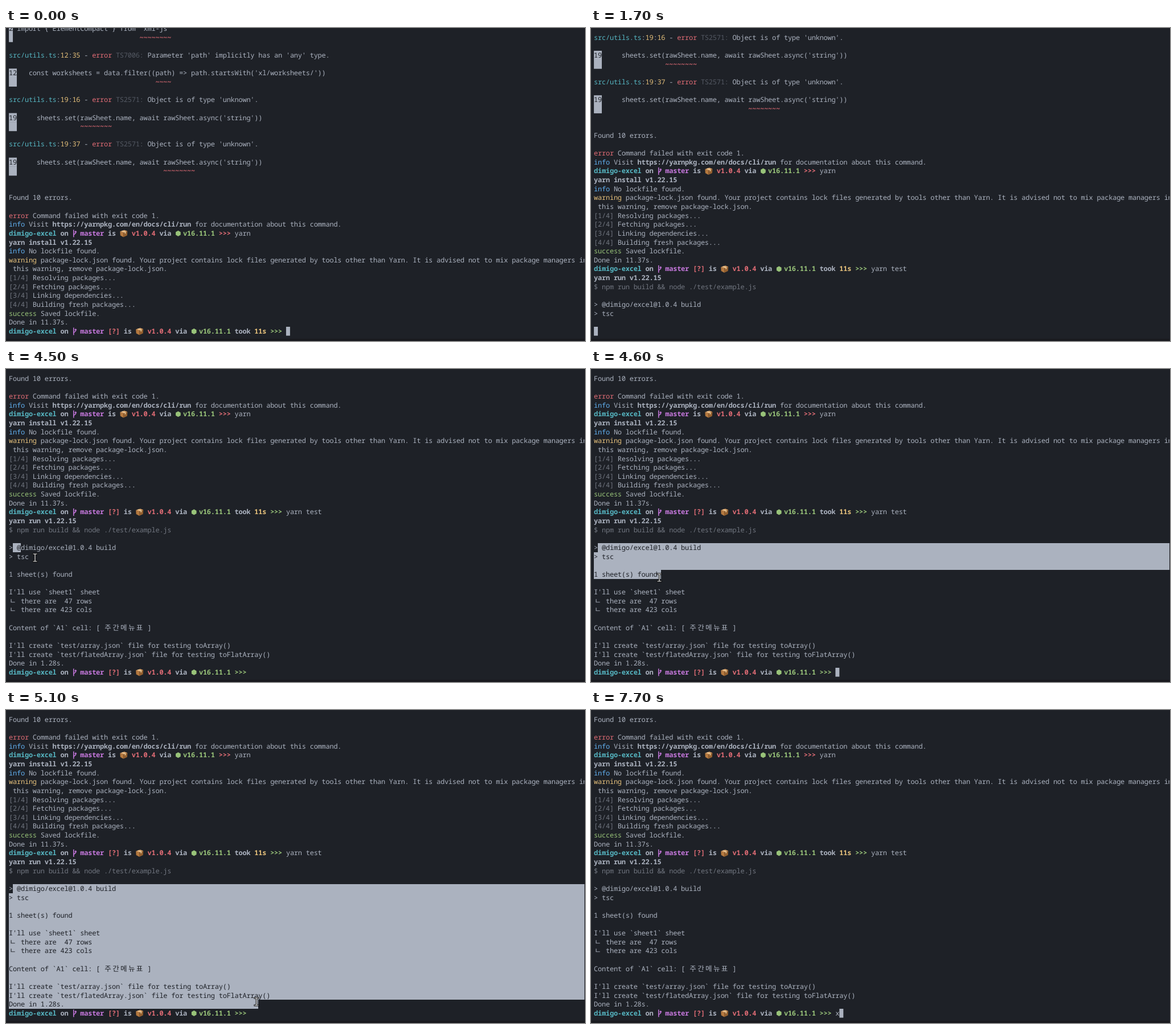
Animation of 1017 by 550 pixels, one loop 8000 ms. Source, as an HTML page with a canvas:

```html
<!DOCTYPE html>
<html lang="en">
<head>
<meta charset="utf-8">
<title>Terminal session</title>
<style>
html, body { margin: 0; width: 100%; height: 100%; overflow: hidden; background: #1e2127; }
canvas { display: block; }
</style>
</head>
<body>
<canvas id="stage" width="1017" height="550"></canvas>
<script>
const ctx = document.getElementById('stage').getContext('2d');
const W = 1017, H = 550, LOOP = 8000;
const CELL = 6.955, LINE = 15.645, LEFT = 5.1, LAST_TOP = 525, ROWS = 35;
const BG = '#1e2127', FG = '#abb2bf';
const SIZE = 12;
const MONO = SIZE + 'px "Noto Sans Mono", "DejaVu Sans Mono", monospace';
const HANGUL = '12.5px "Noto Sans CJK KR", "Noto Sans CJK", sans-serif';
// Noto Sans Mono advances 0.6 em; the terminal grid is slightly tighter.
const TRACKING = (CELL - SIZE * 0.6).toFixed(3) + 'px';

// Markup: ^ plus a colour letter starts a segment; upper case is bold, s is inverse.
const COLORS = {
  d: FG, c: '#56b6c2', y: '#e5c07b', r: '#e06c75', k: '#545963',
  g: '#70757f', b: '#61afef', m: '#c678dd', n: '#98c379', s: BG
};

const tildes = (gutter, col, n) =>
  '^s' + ' '.repeat(gutter) + '^R' + ' '.repeat(col - gutter) + '~'.repeat(n);
const issue = (pos, code, text) =>
  `^csrc/utils.ts^d:^y${pos.replace(':', '^d:^y')}^d - ^rerror ^k${code}: ^d${text}`;
const prompt = (git, took, mark) =>
  `^Cdimigo-excel ^Don ^M⎇ master ${git}^Dis 📦 ^Rv1.0.4 ^Dvia ^N⬢ v16.11.1 ${took}${mark}>>> ^d`;
const step = (n, text) => `^g[${n}/4] ^d${text}...`;

const unknown = "Object is of type 'unknown'.";
const setCall = "^s19^d     sheets.set(rawSheet.name, await rawSheet.async('string'))";
const testPrompt = prompt('^R[?] ', '^Dtook ^Y11s ', '^N');
const lastPrompt = prompt('^R[?] ', '', '^N');

const lines = [
  "^s2^d import { ElementCompact } from 'xml-js'",
  tildes(1, 33, 8),
  '',
  issue('12:35', 'TS7006', "Parameter 'path' implicitly has an 'any' type."),
  '',
  "^s12^d   const worksheets = data.filter((path) => path.startsWith('xl/worksheets/'))",
  tildes(2, 37, 4),
  '',
  issue('19:16', 'TS2571', unknown),
  '',
  setCall,
  tildes(2, 18, 8),
  '',
  issue('19:37', 'TS2571', unknown),
  '',
  setCall,
  tildes(2, 39, 8),
  '',
  '',
  'Found 10 errors.',
  '',
  '^rerror ^dCommand failed with exit code 1.',
  '^binfo ^dVisit ^Dhttps://yarnpkg.com/en/docs/cli/run^d for documentation about this command.',
  prompt('', '', '^R') + 'yarn',
  '^Dyarn install v1.22.15',
  '^binfo ^dNo lockfile found.',
  '^ywarning ^dpackage-lock.json found. Your project contains lock files generated by tools other than Yarn. It is advised not to mix package managers in',
  ' this warning, remove package-lock.json.',
  step(1, 'Resolving packages'),
  step(2, 'Fetching packages'),
  step(3, 'Linking dependencies'),
  step(4, 'Building fresh packages'),
  '^nsuccess ^dSaved lockfile.',
  'Done in 11.37s.',
  testPrompt + 'yarn test',
  '^Dyarn run v1.22.15',
  '^g$ npm run build && node ./test/example.js',
  '',
  '> @dimigo/excel@1.0.4 build',
  '> tsc',
  '',
  '1 sheet(s) found',
  '',
  "I'll use `sheet1` sheet",
  'ㄴ there are  47 rows',
  'ㄴ there are 423 cols',
  '',
  'Content of `A1` cell: [ 주간메뉴표 ]',
  '',
  "I'll create `test/array.json` file for testing toArray()",
  "I'll create `test/flatedArray.json` file for testing toFlatArray()",
  'Done in 1.28s.'
];
const TEST_ROW = 34, SELECT_ROW = 38, END_ROW = 52;

const keyTimes = [200, 300, 400, 500, 600, 800, 1100, 1200, 1300];
// [time, buffer row holding the cursor]
const scrolls = [[0, 34], [1400, 35], [1500, 37], [1700, 41], [2800, 52]];
const cursorOn = [[0, 2000], [2800, 3200], [3300, 3900], [4600, 5000], [5700, 6200], [6900, 7500], [7700, 8000]];
// Pointer position every 100 ms from the given start
const moves = [
  { from: 3500, to: 4500, path: [[786, 440], [640, 400], [480, 358], [330, 324], [190, 302], [90, 293], [32, 297], [8, 306], [12, 309]] },
  { from: 4500, to: 5700, path: [[51, 331], [120, 366], [205, 405], [300, 445], [385, 480], [443, 503], [440, 512], [432, 515], [423, 515]] },
  { from: 5700, to: 6400, path: [[445, 500], [520, 450], [620, 380], [730, 300], [832, 225], [916, 160], [945, 55]] }
];

const colX = col => LEFT + col * CELL;

function poly(color, points) {
  ctx.fillStyle = color;
  ctx.beginPath();
  points.forEach(([x, y]) => ctx.lineTo(x, y));
  ctx.fill();
}

function stroke(color, width, ...paths) {
  ctx.strokeStyle = color;
  ctx.lineWidth = width;
  ctx.beginPath();
  for (const [start, ...rest] of paths) {
    ctx.moveTo(...start);
    rest.forEach(p => ctx.lineTo(...p));
  }
  ctx.stroke();
}

function drawBranch(x, y, color) {
  stroke(color, 1.5,
    [[x + 2.4, y + 1.5], [x + 2.4, y + 14.5]],
    [[x + 6, y + 4.5], [x + 6, y + 7.5], [x + 2.4, y + 10.5]]);
  poly(color, [[x + 3.6, y + 6], [x + 6, y + 3], [x + 8.2, y + 6]]);
}

function drawHexagon(x, y, color) {
  poly(color, Array.from({ length: 6 }, (_, i) => {
    const a = Math.PI * (i / 3 + 1 / 6);
    return [x + 5.2 + 5 * Math.cos(a), y + 8 + 5 * Math.sin(a)];
  }));
}

function drawBox(x, y) {
  poly('#d9a066', [[x + .5, y + 4.5], [x + 8, y + 2], [x + 13.5, y + 4], [x + 6.5, y + 7]]);
  poly('#b5793f', [[x + .5, y + 4.5], [x + 6.5, y + 7], [x + 6.5, y + 14.5], [x + 1, y + 11.5]]);
  poly('#94602f', [[x + 6.5, y + 7], [x + 13.5, y + 4], [x + 13, y + 11.5], [x + 6.5, y + 14.5]]);
  poly('#edd0a0', [[x + 3.2, y + 3.6], [x + 5, y + 3], [x + 10.6, y + 5.3], [x + 10.4, y + 8], [x + 9, y + 8.6], [x + 8.8, y + 6]]);
}

function drawText(text, x, y, color, bold) {
  ctx.font = (bold ? 'bold ' : '') + MONO;
  ctx.letterSpacing = TRACKING;
  ctx.fillStyle = color;
  ctx.fillText(text, x, y + 12);
}

function drawWide(char, x, y, color) {
  ctx.font = HANGUL;
  ctx.letterSpacing = '0px';
  ctx.textAlign = 'center';
  ctx.fillStyle = color;
  ctx.fillText(char, x + CELL, y + 12);
  ctx.textAlign = 'left';
}

function drawLine(text, y, forced) {
  let col = 0;
  const source = text.startsWith('^') ? text : '^d' + text;
  for (const part of source.split('^').slice(1)) {
    const key = part[0].toLowerCase();
    const bold = key !== part[0];
    const color = forced || COLORS[key];
    for (const [token] of part.slice(1).matchAll(/[ -~]+|./gu)) {
      const x = colX(col);
      if (token === '⎇') {
        drawBranch(x, y, color);
        col += 1;
      } else if (token === '⬢') {
        drawHexagon(x, y, color);
        col += 1;
      } else if (token === '📦') {
        drawBox(x, y);
        col += 2;
      } else if (token.charCodeAt(0) > 127) {
        drawWide(token, x, y, color);
        col += 2;
      } else {
        if (key === 's') {
          ctx.fillStyle = FG;
          ctx.fillRect(x, y, token.length * CELL, LINE + .4);
        }
        drawText(token, x, y, color, bold);
        col += token.length;
      }
    }
  }
}

function drawSelected(text, y, x0, x1) {
  // Whole pixels keep adjoining rows free of seams.
  const left = Math.round(x0), top = Math.round(y);
  const box = [left, top, Math.round(x1) - left, Math.round(y + LINE) - top];
  ctx.save();
  ctx.beginPath();
  ctx.rect(...box);
  ctx.clip();
  ctx.fillStyle = FG;
  ctx.fillRect(...box);
  drawLine(text, y, BG);
  ctx.restore();
}

function pointerAt(t) {
  const move = moves.find(m => t >= m.from && t < m.to);
  if (!move) return null;
  const i = Math.floor((t - move.from) / 100);
  return move.path[Math.min(i, move.path.length - 1)];
}

function drawPointer([x, y]) {
  const beam = [
    [[x, y - 5.5], [x, y + 6.5]],
    [[x - 3, y - 6], [x + 3, y - 6]],
    [[x - 3, y + 7], [x + 3, y + 7]]
  ];
  ctx.lineCap = 'square';
  stroke('#000', 3, ...beam);
  stroke('#fff', 1.2, ...beam);
  ctx.lineCap = 'butt';
}

function drawSelection(t, pointer, rowY) {
  if (t < 4500 || t >= 5300) return;
  const early = t < 4600;
  const endRow = early ? SELECT_ROW
    : Math.min(END_ROW - 1, END_ROW + Math.floor((pointer[1] - LAST_TOP) / LINE));
  const endX = early ? colX(3) : colX(Math.round((pointer[0] - LEFT) / CELL));
  for (let r = SELECT_ROW; r <= endRow; r++) {
    drawSelected(lines[r], rowY(r), r === SELECT_ROW ? colX(1) : LEFT, r === endRow ? endX : W);
  }
}

function draw(t) {
  ctx.fillStyle = BG;
  ctx.fillRect(0, 0, W, H);
  ctx.textRendering = 'geometricPrecision';
  ctx.textBaseline = 'alphabetic';

  const bottom = scrolls.filter(s => t >= s[0]).pop()[1];
  const rowY = r => LAST_TOP - (bottom - r) * LINE;
  const typed = keyTimes.filter(k => t >= k).length;
  const pointer = pointerAt(t);
  let cursorCol = 0;

  for (let r = bottom - ROWS + 1; r <= bottom; r++) {
    let text = lines[r] || '';
    if (r === TEST_ROW) {
      text = testPrompt + 'yarn test'.slice(0, typed);
      if (r === bottom) cursorCol = 70 + typed;
    } else if (r === bottom) {
      text = '';
      if (r === END_ROW && t >= 3300) {
        const input = t >= 7700 ? 'x' : '';
        text = lastPrompt + input;
        cursorCol = 61 + input.length;
      }
    }
    drawLine(text, rowY(r));
  }

  drawSelection(t, pointer, rowY);
  if (cursorOn.some(([a, b]) => t >= a && t < b)) {
    ctx.fillStyle = FG;
    ctx.fillRect(colX(cursorCol), LAST_TOP, CELL, LINE);
  }
  if (pointer) drawPointer(pointer);

  ctx.fillStyle = '#191a1f';
  ctx.fillRect(0, 546, W, 4);
  ctx.fillRect(W - 1, 0, 1, H);
}

const start = performance.now();
function tick() {
  draw((performance.now() - start) % LOOP);
  requestAnimationFrame(tick);
}
tick();
</script>
</body>
</html>
```
